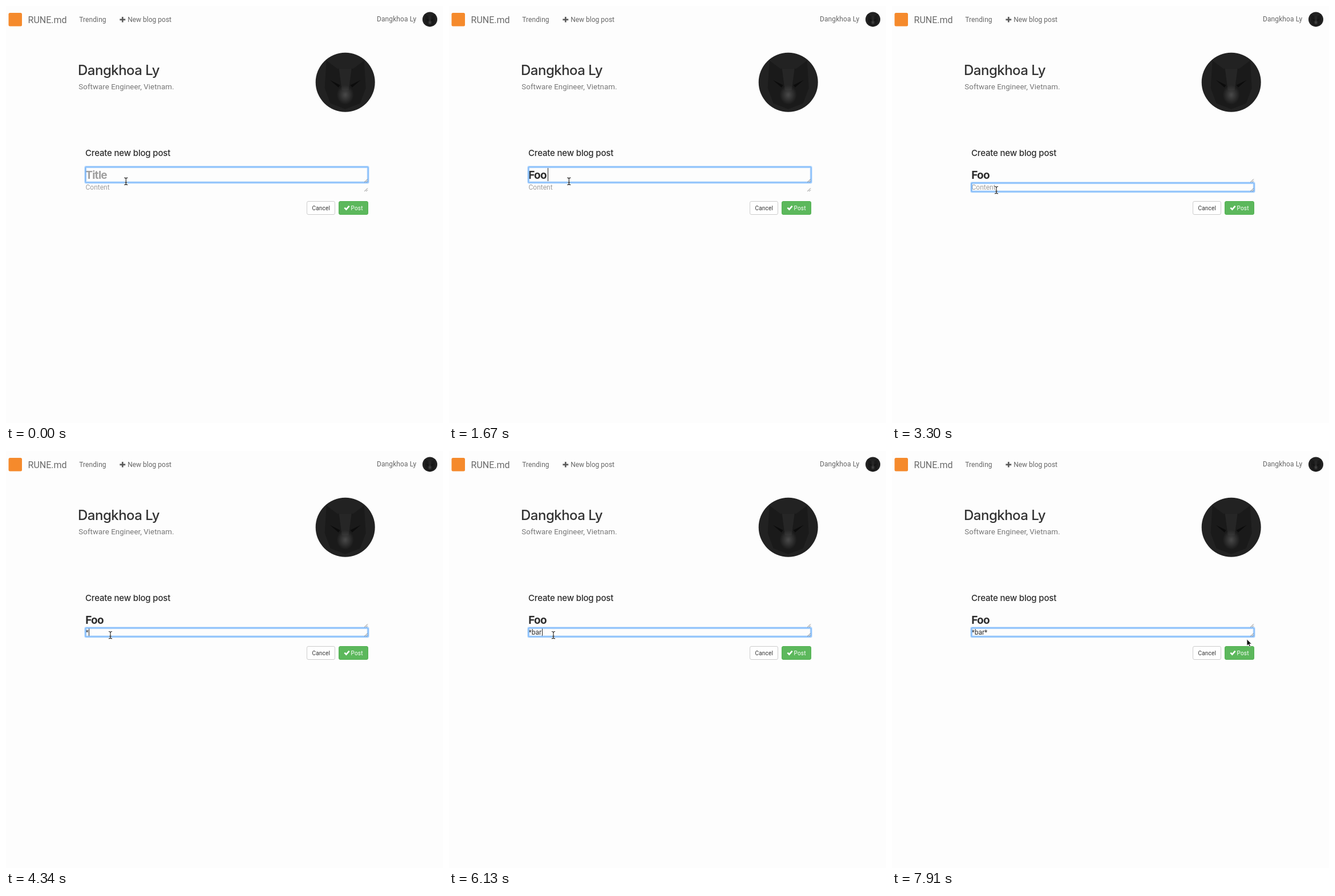
Animation, 766 px wide and 731 px high, one loop 8000 ms. Source, as an HTML page:

```html
<!DOCTYPE html>
<html lang="en">
<head>
<meta charset="utf-8">
<title>New blog post</title>
<style>
  html, body { margin: 0; width: 100%; height: 100%; overflow: hidden; background: #fdfdfd; }
  svg { display: block; font: 12px Roboto, "Liberation Sans", sans-serif; }
  text { white-space: pre; }
  .nav { fill: #666; }
  .hint { fill: #9f9f9f; }
  .typed { fill: #2b2b2b; }
  .head { font-family: Inter, Roboto, sans-serif; }
  .btn { font-size: 10px; letter-spacing: .2px; }
  .ring rect { fill: none; }
  .grip { fill: none; stroke: #6f6f6f; stroke-width: .9; }
</style>
</head>
<body>
<svg width="766" height="731" viewBox="0 0 766 731">
  <defs>
    <radialGradient id="muzzle">
      <stop offset="0" stop-color="#4a4a4a"/>
      <stop offset="1" stop-color="#4a4a4a" stop-opacity="0"/>
    </radialGradient>
    <g id="avatar">
      <circle r="52" fill="#222"/>
      <path d="M-33-38 L-14-24 H14 L33-38 L36 10 L26 37 L0 47 L-26 37 L-36 10Z" fill="#1a1a1a"/>
      <path d="M-11-24 H11 L6 14 H-6Z" fill="#262626"/>
      <path d="M-27-4 L-9 5 L-12 9Z M27-4 L9 5 L12 9Z" fill="#0c0c0c"/>
      <ellipse cy="22" rx="15" ry="17" fill="url(#muzzle)"/>
    </g>
    <path id="grip" class="grip" d="M0 5.5 L5.5 0 M3 5.5 L5.5 3"/>
    <path id="stem" d="M-3-6.2Q-.2-6.2 0-4.6Q.2-6.2 3-6.2M0-5V5M-3 6.2Q-.2 6.2 0 4.6Q.2 6.2 3 6.2M-1.8 2H1.8"/>
  </defs>

  <rect x="4.5" y="12" width="23.5" height="23.5" rx="2.5" fill="#f58a2c"/>
  <text x="38.6" y="29.8" font-size="16" fill="#6a6a6a">RUNE.md</text>
  <text class="nav" x="128.2" y="28" letter-spacing=".1">Trending</text>
  <path d="M204.3 19v9.6M199.4 23.8h9.8" stroke="#5c5c5c" stroke-width="2.7"/>
  <text class="nav" x="213.2" y="28">New blog post</text>
  <text class="nav" x="650" y="27.3" letter-spacing=".1">Dangkhoa Ly</text>
  <use href="#avatar" transform="translate(743 23.4) scale(.25)"/>

  <text class="head" x="126" y="121" font-size="24" font-weight="500" letter-spacing="-.5" fill="#333">Dangkhoa Ly</text>
  <text x="127.3" y="146" font-size="13.3" letter-spacing=".05" fill="#777">Software Engineer, Vietnam.</text>
  <use href="#avatar" x="594.7" y="133.7"/>

  <text class="head" x="139" y="263.3" font-size="15" font-weight="500" letter-spacing="-.18" fill="#2b2b2b">Create new blog post</text>
  <g class="head" font-size="19" font-weight="700" letter-spacing="-.7"><text id="title" x="139.2" y="303"></text></g>
  <text id="content" x="139.5" y="322"></text>
  <rect id="caret" width="1" fill="#222"/>
  <g id="ring" class="ring">
    <rect x="139.3" width="495.4" rx="1" stroke="#6cb0fa" stroke-opacity=".35" stroke-width="4.2"/>
    <rect x="139.3" width="495.4" rx="1" stroke="#7cb8fb" stroke-opacity=".9" stroke-width="2"/>
  </g>
  <use href="#grip" x="628.3" y="303.5"/>
  <use href="#grip" x="628.3" y="319.5"/>

  <rect x="527.5" y="342.5" width="49" height="23" rx="2.5" fill="#fff" stroke="#ccc"/>
  <text class="btn" x="536.5" y="357.6" fill="#333">Cancel</text>
  <rect x="583.5" y="342.5" width="51" height="23" rx="2.5" fill="#5cb85c" stroke="#52b152"/>
  <path d="M593.4 353.6l3 3 5.2-6" fill="none" stroke="#fff" stroke-width="2.6"/>
  <text class="btn" x="604.5" y="357.6" fill="#fff">Post</text>

  <g id="beam" fill="none">
    <use href="#stem" stroke="#fff" stroke-opacity=".8" stroke-width="2.4"/>
    <use href="#stem" stroke="#1a1a1a" stroke-width="1.1"/>
  </g>
  <path id="arrow" d="M0 0V11.6L2.7 9.2L4.6 13.4L6.6 12.5L4.8 8.4H8.4Z" fill="#111" stroke="#fff" stroke-width=".8"/>
</svg>

<script>
const LOOP = 8000;
const $ = id => document.getElementById(id);

// Each step changes only the listed parts; caret 0 means hidden.
const steps = [
  [0, { title: "", content: "", caret: 139, focus: "title", pointer: "beam", at: [210.3, 307.3] }],
  [450, { caret: 0 }],
  [920, { caret: 139 }],
  [1370, { title: "F", caret: 150 }],
  [1520, { title: "Fo", caret: 162 }],
  [1670, { title: "Foo", caret: 173 }],
  [2120, { caret: 0 }],
  [2560, { caret: 173 }],
  [2710, { at: [197, 314] }],
  [2850, { at: [183, 322.7] }],
  [3150, { caret: 0 }],
  [3300, { focus: "content", caret: 139 }],
  [3750, { caret: 0 }],
  [4340, { content: "*", caret: 145 }],
  [4790, { caret: 0 }],
  [4940, { content: "*b", caret: 152 }],
  [5090, { content: "*ba", caret: 159 }],
  [5230, { content: "*bar", caret: 163 }],
  [5680, { caret: 0 }],
  [6130, { caret: 163 }],
  [6730, { caret: 0 }],
  [7020, { content: "*bar*", caret: 169 }],
  [7470, { caret: 0 }],
  [7620, { pointer: "arrow", at: [288, 331] }],
  [7760, { at: [590, 278] }],
  [7910, { at: [622, 329.8] }]
];

const fields = {
  title: { hint: "Title", top: 282.2, height: 27.2, caretTop: 284, caretHeight: 23 },
  content: { hint: "Content", top: 310.2, height: 15.2, caretTop: 310, caretHeight: 14.5 }
};

function setAttrs(el, attrs) {
  for (const key in attrs) el.setAttribute(key, attrs[key]);
}

function draw(time) {
  const state = {};
  for (const [start, change] of steps) if (start <= time) Object.assign(state, change);

  for (const id in fields) {
    const el = $(id);
    el.textContent = state[id] || fields[id].hint;
    el.setAttribute("class", state[id] ? "typed" : "hint");
  }

  const field = fields[state.focus];
  for (const rect of $("ring").children) setAttrs(rect, { y: field.top, height: field.height });
  setAttrs($("caret"), {
    x: state.caret, y: field.caretTop, height: field.caretHeight,
    visibility: state.caret ? "visible" : "hidden"
  });

  for (const id of ["beam", "arrow"]) {
    setAttrs($(id), {
      transform: `translate(${state.at})`,
      visibility: state.pointer === id ? "visible" : "hidden"
    });
  }
}

const begin = performance.now();
function tick() {
  draw((performance.now() - begin) % LOOP);
  requestAnimationFrame(tick);
}
tick();
</script>
</body>
</html>
```
